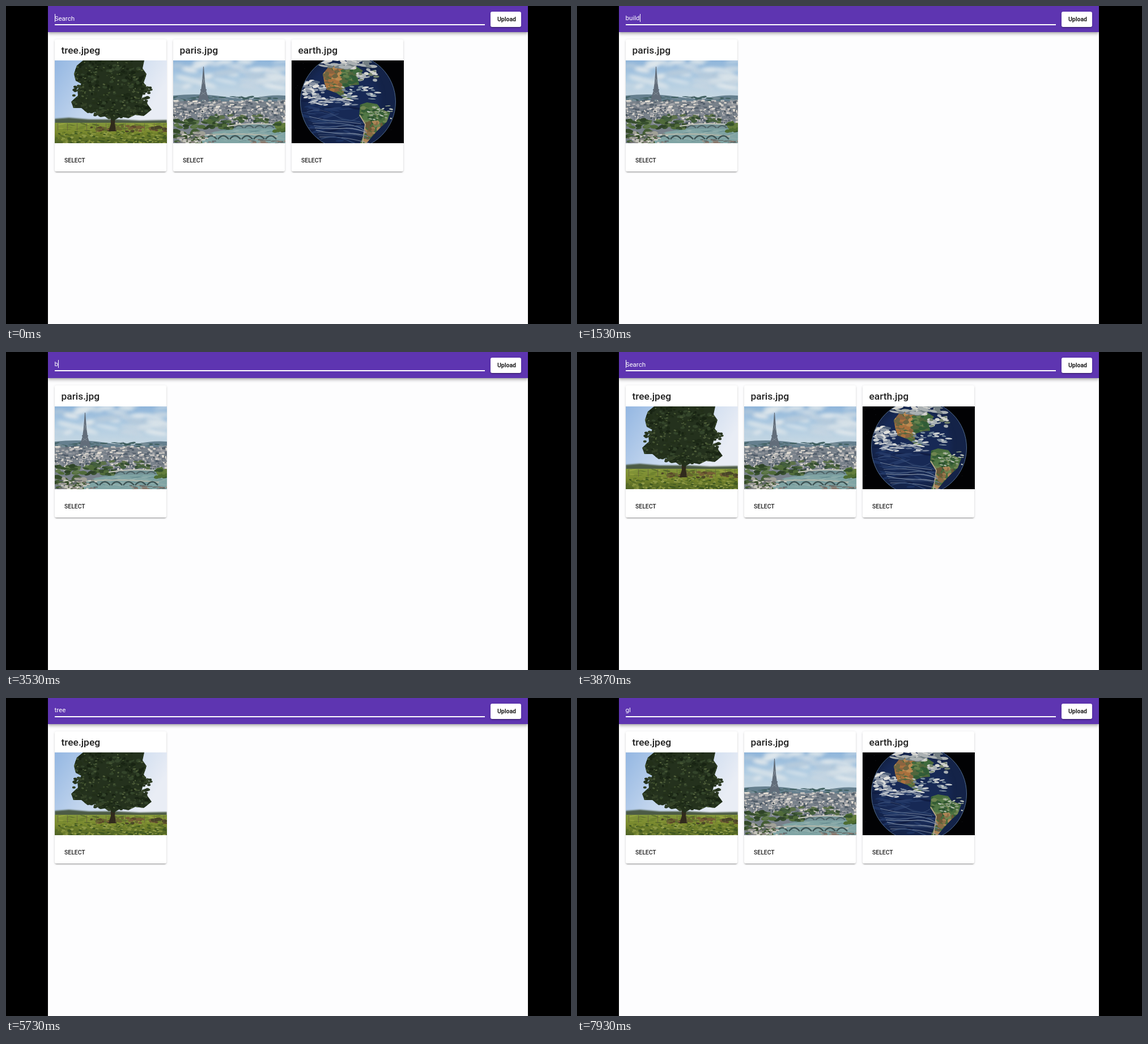
An HTML page with a canvas that plays this animation: 997 px wide and 561 px high, repeating every 8000 ms.

```html
<!DOCTYPE html>
<html lang="en">
<head>
<meta charset="utf-8">
<title>Image search</title>
<style>
html, body { margin: 0; width: 100%; height: 100%; overflow: hidden; background: #000; }
body { position: relative; font-family: Roboto, sans-serif; }
div, canvas, span { position: absolute; white-space: pre; }
#page { left: 74px; top: 0; width: 847px; height: 561px; background: #fdfdfe; overflow: hidden; }
#bar { left: 0; top: 0; width: 847px; height: 46px; background: #5e35b1;
  box-shadow: 0 2px 3.5px -1px rgba(0,0,0,.2), 0 3.5px 4.5px rgba(0,0,0,.14), 0 1px 8.7px rgba(0,0,0,.12); }
#query { left: 11.5px; top: 13px; font-size: 11.6px; line-height: 16px; color: #fff; }
#query.empty { top: 14px; }
#caret { top: 14px; width: 1px; height: 14px; background: #fff; }
#line { left: 11.5px; top: 32px; width: 759px; height: 1.7px; background: #fff; }
#upload { left: 781px; top: 10px; width: 54px; height: 27px; border-radius: 3px; background: #fff;
  font-size: 10.5px; font-weight: 700; line-height: 27px; color: #212121; text-align: center; text-indent: 3px;
  box-shadow: 0 2.6px 1px -1.7px rgba(0,0,0,.2), 0 1.7px 1.7px rgba(0,0,0,.14), 0 1px 4.4px rgba(0,0,0,.12); }
.card { top: 59px; width: 197.5px; height: 233px; border-radius: 3px; background: #fff; color: #212121; font-weight: 500;
  box-shadow: 0 2.6px 1px -1.7px rgba(0,0,0,.2), 0 1.7px 1.7px rgba(0,0,0,.14), 0 1px 4.4px rgba(0,0,0,.12); }
.title { left: 12px; top: 7px; font-size: 17.4px; line-height: 24px; }
.card canvas { left: 0; top: 37px; width: 198px; height: 146px; }
.select { left: 17.5px; top: 206px; font-size: 10.4px; line-height: 16px; }
</style>
</head>
<body>
<div id="page">
  <div id="bar">
    <span id="query"></span>
    <div id="caret"></div>
    <div id="line"></div>
    <div id="upload">Upload</div>
  </div>
</div>
<script>
const W = 198, H = 146, LOOP = 8000, BLINK = 530;
const page = document.getElementById('page');
const query = document.getElementById('query');
const caret = document.getElementById('caret');

function randomFrom(seed) {
  return () => {
    seed = (seed * 1664525 + 1013904223) >>> 0;
    return seed / 4294967296;
  };
}

// Small set of drawing helpers bound to one photo
function painter(ctx, seed) {
  const rnd = randomFrom(seed);
  const between = (a, b) => a + (b - a) * rnd();
  const pick = list => list[Math.floor(rnd() * list.length)];
  const trace = text => new Path2D(text);
  const fade = (x0, y0, x1, y1, ...colors) => {
    const g = ctx.createLinearGradient(x0, y0, x1, y1);
    colors.forEach((c, i) => g.addColorStop(i / (colors.length - 1), c));
    return g;
  };
  const rect = (x, y, w, h, color) => { ctx.fillStyle = color; ctx.fillRect(x, y, w, h); };
  const shape = (text, color) => { ctx.fillStyle = color; ctx.fill(trace(text)); };
  const line = (text, color, width) => {
    ctx.strokeStyle = color; ctx.lineWidth = width; ctx.stroke(trace(text));
  };
  const oval = (x, y, rx, ry, color, turn = 0) => {
    ctx.fillStyle = color;
    ctx.beginPath();
    ctx.ellipse(x, y, rx, ry, turn, 0, Math.PI * 2);
    ctx.fill();
  };
  const specks = (count, [x0, y0, x1, y1], [w, h], colors) => {
    for (let i = 0; i < count; i++)
      oval(between(x0, x1), between(y0, y1), w * between(.4, 1), h * between(.4, 1), pick(colors), between(-.3, .3));
  };
  const blocks = (count, [x0, y0, x1, y1], [w, h], colors) => {
    for (let i = 0; i < count; i++)
      rect(between(x0, x1), between(y0, y1), w * between(.4, 1), h * between(.4, 1), pick(colors));
  };
  const clipped = (text, draw) => { ctx.save(); ctx.clip(trace(text)); draw(); ctx.restore(); };
  const soft = (px, draw) => { ctx.filter = `blur(${px}px)`; draw(); ctx.filter = 'none'; };
  return { rnd, between, pick, fade, rect, shape, line, oval, specks, blocks, clipped, soft };
}

function drawTree(p) {
  const crown = 'M50 0L39 9 34 24 37 36 47 41 40 52 41 62 29 73 33 84 47 84 58 93 72 91 80 100 95 98 103 107 ' +
    '116 99 130 102 142 96 157 98 171 87 163 76 153 70 155 59 163 49 157 39 162 24 155 14 158 0Z';
  p.rect(0, 0, W, 112, p.fade(0, 0, 160, 100, '#94b7e2', '#c5d7ee', '#e9edf5'));
  p.soft(1, () => p.shape('M0 103L25 101 60 104 110 104 150 106 198 105V114H0Z', '#4c5b45'));
  p.rect(0, 110, W, 36, p.fade(0, 110, 0, H, '#83973b', '#79882d', '#4d6124'));
  p.specks(90, [0, 112, W, 124], [9, 1.3], ['#99a543', '#6d802e', '#839237', '#586b2a']);
  p.specks(45, [65, 116, 198, 126], [6, 3], ['#5b492b', '#766036', '#4a4528', '#67662f']);
  p.specks(280, [0, 126, W, H], [4, 1.7], ['#3d5520', '#6c7e2c', '#84913c', '#536826', '#919d4a']);
  p.shape('M98 82L99 112 95 125H109L106 112 108 82Z', '#302a1c');
  p.shape(crown, '#24311d');
  p.clipped(crown, () => {
    p.specks(260, [30, 0, 172, 105], [5, 3.5], ['#182313', '#222f19', '#33442a', '#1c2916']);
    p.specks(150, [34, 0, 165, 98], [2.5, 1.5], ['#475735', '#3c4d2b', '#52613c']);
  });
  for (let i = 0; i < 95; i++) {
    const a = p.between(-.3, Math.PI + .3);
    p.oval(101 + Math.cos(a) * p.between(55, 69), 55 + Math.sin(a) * p.between(36, 47), 3, 2, p.pick(['#25321d', '#334127']));
  }
  for (let x = 5; x < W; x += 17) p.rect(x, 111, .7, 13, '#655c3e');
}

function drawCity(p) {
  p.rect(0, 0, W, 80, p.fade(0, 0, 0, 70, '#8fb5da', '#b1cde3', '#cad9e2'));
  p.soft(3, () => p.specks(38, [0, 0, W, 48], [24, 5], ['#d7e2e9', '#e4eaed', '#b7cbdc', '#c7d6e2']));
  p.shape('M0 62Q45 57 90 64T145 66Q173 60 198 62V82H0Z', '#657f8e');
  p.specks(60, [0, 64, W, 73], [7, 2], ['#526f77', '#778c96', '#405f60']);
  p.rect(0, 72, W, 74, '#78818a');
  p.blocks(480, [-3, 69, W, 112], [8, 3.5], ['#c8c5c2', '#a6a7ab', '#6a717c', '#e0dbd2', '#505c69', '#8a8f96']);
  p.blocks(180, [-3, 86, W, 113], [3, 4], ['#d9d4cc', '#59636e', '#b8b5b2', '#414e55']);
  p.shape('M94 122Q116 110 198 111V139H65Z', '#749397');
  p.specks(65, [0, 105, 105, 121], [8, 4], ['#38502f', '#506b3a', '#2e4328', '#60794b']);
  p.specks(35, [65, 96, 175, 109], [7, 3], ['#45603e', '#5d724a', '#354d33']);
  p.shape('M72 126Q115 118 198 121V146H25Z', '#80a4a4');
  p.specks(60, [80, 122, 190, 142], [13, .7], ['#9bb5b1', '#688d91', '#8eabab']);
  p.line('M95 116Q145 108 198 115', '#c5c7bc', 2);
  for (let x = 108; x < 185; x += 18) p.line(`M${x} 119q8 -8 16 0`, '#4e6265', 2);
  p.line('M48 132Q120 127 184 134', '#aeb5a9', 2.4);
  for (let x = 58; x < 175; x += 21) p.line(`M${x} 139q9 -12 19 0`, '#3d5354', 2.4);
  p.specks(50, [0, 124, 53, H], [7, 5], ['#344a29', '#445d35', '#a1a197', '#6f766d']);
  p.blocks(55, [0, 129, 75, H], [8, 3], ['#aaa6a0', '#596167', '#ceccc4', '#7e7975']);
  p.specks(24, [179, 110, W, 125], [7, 5], ['#35512d', '#4e6d32', '#637d3d']);
  p.blocks(28, [125, 138, W, H], [12, 3], ['#88776c', '#626967', '#9e978c']);
  const tower = '#626d7a';
  p.shape('M53 11L54 11 56 37 58 53 64 73H59Q53 64 48 73H43L49 53 51 37Z', tower);
  p.rect(48, 51, 11, 2, tower);
  p.rect(45, 62, 17, 2, tower);
  p.line('M50 56L57 61M57 56L49 61M52 31L56 42M56 31L51 42', '#929ca5', .6);
}

function drawGlobe(p) {
  const disc = 'M15.5 73a84 84 0 1 0 168 0a84 84 0 1 0 -168 0Z';
  const north = 'M55 24L65 12 90 7 112 10 126 18 117 31 119 43 105 44 94 48 92 57 101 64 107 72 94 68 80 58 70 54 62 51 58 40Z';
  const south = 'M121 78L133 74 151 77 157 86 174 92 168 108 156 119 144 132 132 146H121L129 127 130 112 119 98Z';
  p.rect(0, 0, W, H, '#020204');
  for (let i = 0; i < 30; i++) p.rect(p.between(0, W), p.between(0, H), .7, .7, '#32353e');
  p.shape(disc, '#142348');
  p.clipped(disc, () => {
    p.soft(5, () => p.oval(90, 70, 66, 69, '#172955'));
    p.specks(55, [22, 65, 126, 142], [17, 2], ['#1c3261', '#101d43', '#243967']);
    p.shape(north, '#52663d');
    p.clipped(north, () => {
      p.specks(75, [55, 12, 91, 57], [7, 4], ['#a9713e', '#bd8a51', '#8b6440', '#6d6541']);
      p.specks(55, [89, 10, 124, 47], [6, 4], ['#315c37', '#3e6a3d', '#66804c']);
      p.specks(22, [72, 48, 108, 72], [4, 3], ['#53723e', '#7c7845']);
    });
    p.shape(south, '#496d3d');
    p.clipped(south, () => {
      p.specks(80, [120, 77, 171, 115], [6, 4], ['#345c35', '#527846', '#6f8550', '#2c5130']);
      p.specks(45, [127, 109, 160, 146], [5, 4], ['#8a6d45', '#ad8657', '#6b5938']);
    });
    p.line('M120 96L130 113 125 146', '#b8a78b', 1.7);
    p.soft(.5, () => {
      p.specks(55, [55, -5, 145, 14], [10, 3], ['#d3d3d0', '#aab0b2', '#737e83']);
      p.specks(60, [22, 36, 55, 65], [7, 3], ['#c8cdd0', '#8993a3', '#e0e0dd', '#53637d']);
      p.specks(38, [37, 65, 112, 79], [10, 1.6], ['#bac1ca', '#77849a', '#e1e2df']);
      p.specks(27, [90, 46, 153, 68], [7, 2], ['#c9cecf', '#76899a']);
      p.specks(24, [117, 15, 150, 40], [6, 3], ['#a9b0b4', '#74836d', '#d4d5d0']);
      p.specks(34, [135, 80, 177, 105], [4, 1.3], ['#97a58b', '#c7cec2']);
    });
    for (let i = 0; i < 13; i++) {
      const y = 91 + i * 4;
      p.line(`M${27 + i * 2} ${y}q25 ${p.between(-10, 8)} 50 ${p.between(-2, 9)}t42 ${p.between(2, 13)}`,
        p.pick(['#8795aa', '#586c8d', '#aab4c0', '#354e79']), p.between(.4, 1.3));
    }
  });
  p.line(disc, '#526c8e', 1);
}

const cards = [['tree.jpeg', drawTree], ['paris.jpg', drawCity], ['earth.jpg', drawGlobe]].map(([name, draw], i) => {
  const card = document.createElement('div');
  card.className = 'card';
  card.innerHTML = `<span class="title">${name}</span><canvas width="${W}" height="${H}"></canvas><span class="select">SELECT</span>`;
  page.append(card);
  draw(painter(card.querySelector('canvas').getContext('2d'), 71 + i * 37));
  return card;
});

// [time, typed text]; the first entry sets the blink phase
const edits = [
  [-400, ''], [470, 'b'], [670, 'bu'], [870, 'bui'], [1130, 'buil'], [1400, 'build'],
  [3330, 'buil'], [3400, 'bui'], [3470, 'bu'], [3530, 'b'], [3600, ''],
  [4270, 't'], [4470, 'tr'], [4670, 'tre'], [5130, 'tree'],
  [6070, 'tre'], [6200, 'tr'], [6470, 't'], [6670, ''], [7270, 'g'], [7330, 'gl']
];
// [time, visible cards]
const results = [
  [0, [0, 1, 2]], [800, [1, 2]], [1200, [1]], [3670, [0, 1, 2]],
  [4800, [0, 1]], [5200, [0]], [6130, [0, 1]], [6250, [0, 1, 2]]
];
const latest = (steps, t) => steps.findLast(step => step[0] <= t);

function render(t) {
  const [since, text] = latest(edits, t);
  query.textContent = text || 'Search';
  query.className = text ? '' : 'empty';
  caret.style.left = 11.5 + (text ? query.getBoundingClientRect().width : 0) + 'px';
  caret.style.visibility = (t - since) % (2 * BLINK) < BLINK ? 'visible' : 'hidden';
  const shown = latest(results, t)[1];
  cards.forEach((card, i) => {
    const slot = shown.indexOf(i);
    card.style.display = slot < 0 ? 'none' : 'block';
    card.style.left = 11.5 + slot * 209 + 'px';
  });
}

const start = performance.now();
function tick() {
  render((performance.now() - start) % LOOP);
  requestAnimationFrame(tick);
}
tick();
</script>
</body>
</html>
```
